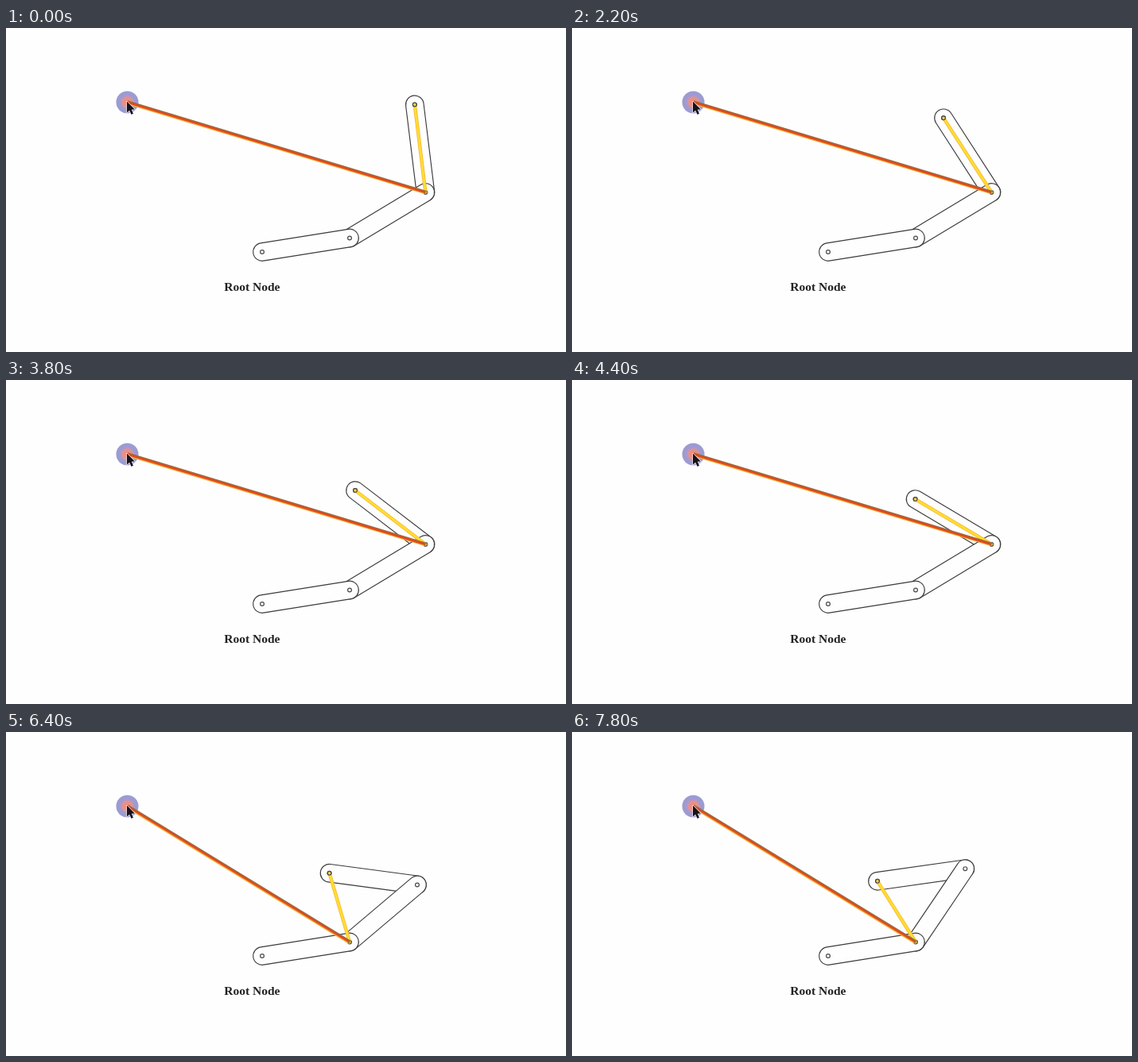
Recreate the animation shown at these times as an HTML page with a canvas. Size 704x408 px, loop 8000 ms.

```html
<!DOCTYPE html>
<html lang="en">
<head>
<meta charset="utf-8">
<title>Joint chain</title>
<style>
html, body { margin: 0; width: 100%; height: 100%; overflow: hidden; background: #fefefe; }
canvas { display: block; }
</style>
</head>
<body>
<canvas id="stage" width="704" height="408"></canvas>
<script>
const ctx = document.getElementById('stage').getContext('2d');
const LOOP = 8000, STEP = 200, SWITCH = 5600;
const LEN = 111.4, RADIUS = 11.3;
const root = { x: 322, y: 282 };
const elbow = { x: 432, y: 264.5 };
const target = { x: 152.5, y: 93.5 };

// [time in ms, heading in degrees, counterclockwise from the right]
const midKeys = [[0, 31.1], [SWITCH, 31.1], [6000, 35], [6400, 40.3], [7200, 49.4], [7800, 56]];
const tipKeys = [[0, 97], [1400, 112.2], [3000, 133.4], [4400, 149.3], [SWITCH, 163.2]];

function sample(keys, t) {
  let i = 1;
  while (i < keys.length && keys[i][0] < t) i++;
  if (i === keys.length) return keys[i - 1][1];
  const [t0, a] = keys[i - 1], [t1, b] = keys[i];
  return a + (b - a) * (t - t0) / (t1 - t0);
}

function reach(from, degrees) {
  const a = degrees * Math.PI / 180;
  return { x: from.x + LEN * Math.cos(a), y: from.y - LEN * Math.sin(a) };
}

function disc(p, r) {
  ctx.beginPath();
  ctx.arc(p.x, p.y, r, 0, Math.PI * 2);
}

function link(a, b) {
  const ang = Math.atan2(b.y - a.y, b.x - a.x), q = Math.PI / 2;
  ctx.beginPath();
  ctx.arc(a.x, a.y, RADIUS, ang + q, ang - q);
  ctx.arc(b.x, b.y, RADIUS, ang - q, ang + q);
  ctx.closePath();
  ctx.fillStyle = '#fefefe';
  ctx.fill();
  ctx.strokeStyle = '#3c3c3c';
  ctx.lineWidth = 1.15;
  ctx.stroke();
}

function pin(p) {
  disc(p, 2.4);
  ctx.strokeStyle = '#4a4a4a';
  ctx.lineWidth = 1.2;
  ctx.stroke();
}

// shift moves the stroke sideways, towards the lower left for positive values
function ray(a, b, color, width, shift = 0) {
  const d = Math.hypot(b.x - a.x, b.y - a.y);
  const nx = -(b.y - a.y) / d * shift, ny = (b.x - a.x) / d * shift;
  ctx.beginPath();
  ctx.moveTo(a.x + nx, a.y + ny);
  ctx.lineTo(b.x + nx, b.y + ny);
  ctx.strokeStyle = color;
  ctx.lineWidth = width;
  ctx.stroke();
}

function ball() {
  const { x, y } = target;
  disc(target, 14);
  ctx.fillStyle = '#9c9bd2';
  ctx.fill();
  const glow = ctx.createRadialGradient(x, y, 1, x, y, 10);
  glow.addColorStop(0, '#ff8468');
  glow.addColorStop(0.55, 'rgba(240,145,135,0.85)');
  glow.addColorStop(1, 'rgba(190,150,190,0)');
  disc(target, 10);
  ctx.fillStyle = glow;
  ctx.fill();
}

function pointer() {
  const pts = [[0, 0], [0, 14], [3.2, 11.2], [5.6, 16.4], [8, 15.3], [5.7, 10.3], [9.8, 10]];
  ctx.beginPath();
  for (const [x, y] of pts) ctx.lineTo(152 + x, 92.5 + y);
  ctx.closePath();
  ctx.lineJoin = 'round';
  ctx.strokeStyle = 'rgba(255,255,255,0.75)';
  ctx.lineWidth = 1.6;
  ctx.stroke();
  ctx.fillStyle = '#17131a';
  ctx.fill();
}

function draw(t) {
  const mid = sample(midKeys, t);
  const wrist = reach(elbow, mid);
  const tip = reach(wrist, sample(tipKeys, t) + mid - midKeys[0][1]);
  const pivot = t < SWITCH ? wrist : elbow;

  ctx.fillStyle = '#fefefe';
  ctx.fillRect(0, 0, 704, 408);
  link(wrist, tip);
  link(elbow, wrist);
  link(root, elbow);
  [root, elbow, wrist, tip].forEach(pin);

  ball();
  ctx.lineCap = 'round';
  ray(pivot, tip, '#f6b437', 4.4);
  ray(pivot, tip, '#ffdf2e', 2.8);
  ctx.lineCap = 'butt';
  ray(target, pivot, '#f4ac35', 2.6, 1.2);
  ray(target, pivot, '#8d7048', 2.2, -1.2);
  ray(target, pivot, '#e04a1c', 2.6);
  pin(tip);
  disc(pivot, 1.8);
  ctx.strokeStyle = '#8b7a3c';
  ctx.lineWidth = 1;
  ctx.stroke();
  pointer();

  ctx.fillStyle = '#222';
  ctx.font = 'bold 15.5px "Liberation Serif", "Times New Roman", serif';
  ctx.fillText('Root Node', 274.3, 330.5);
}

const start = performance.now();
function frame() {
  const t = Math.max(0, performance.now() - start) % LOOP;
  draw(Math.floor(t / STEP) * STEP);
  requestAnimationFrame(frame);
}
frame();
</script>
</body>
</html>
```
